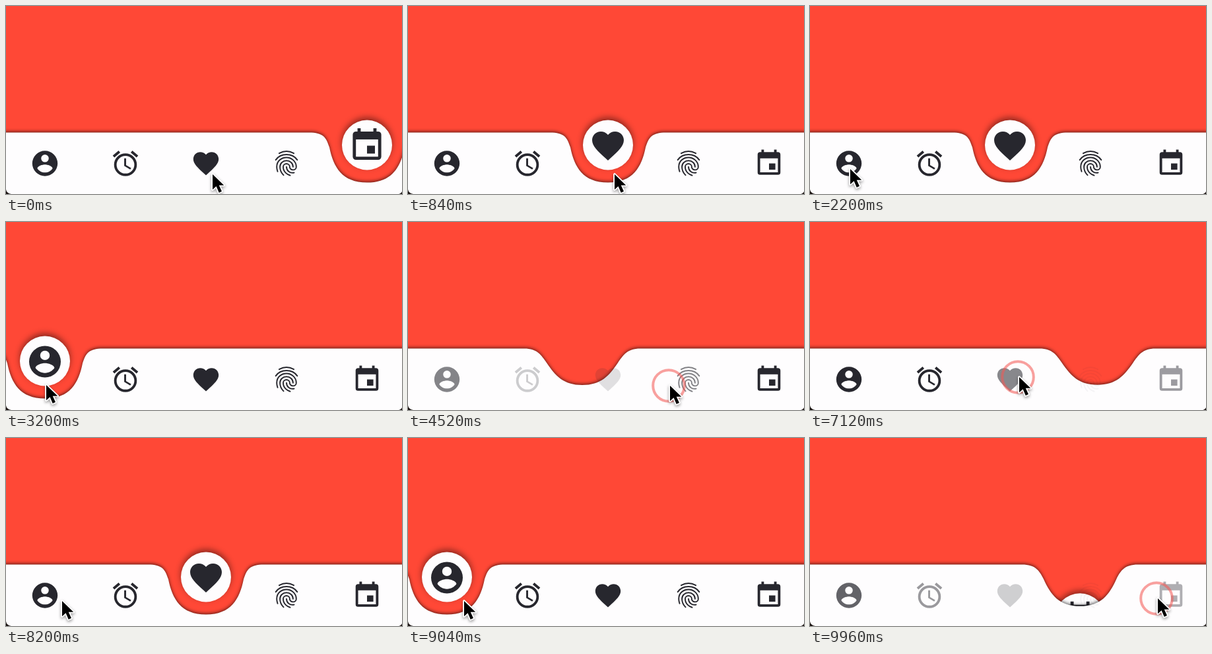
Recreate the animation shown at these times as an HTML page with a canvas. Size 600 by 286 pixels, loop 10 s.

```html
<!DOCTYPE html>
<html lang="en">
<head>
<meta charset="utf-8">
<title>Curved navigation bar</title>
<style>
  html, body { margin: 0; width: 100%; height: 100%; overflow: hidden; background: #ff4836; }
  canvas { display: block; width: 600px; height: 286px; }
</style>
</head>
<body>
<canvas id="stage" width="600" height="286"></canvas>
<script>
const ctx = document.getElementById('stage').getContext('2d');
const LOOP = 10000, TRAVEL = 450;
const RED = '#ff4836', WHITE = '#fefdfe', INK = '#27272e';
const BAR_TOP = 192.6, BUTTON_Y = 211.5;

// Icons live on a 24 unit grid; "line" paths are stroked, "fill" paths filled.
const icons = [
  { fill: 'M12 2a10 10 0 1 0 0 20a10 10 0 0 0 0-20zM12 5a3 3 0 1 1 0 6a3 3 0 0 1 0-6z' +
          'M12 19.2c-2.5 0-4.7-1.3-6-3.2c0-2 4-3.1 6-3.1s6 1.1 6 3.1c-1.3 1.9-3.5 3.2-6 3.2z' },
  { line: 'M20 13a8 8 0 1 1-16 0a8 8 0 1 1 16 0zM2.6 6.5l4.6-3.9M21.4 6.5l-4.6-3.9', width: 2,
    fill: 'M11 8h1.5v5.25l4 2.37l-.75 1.23L11 14z' },
  { fill: 'M12 21.35l-1.45-1.32C5.4 15.36 2 12.28 2 8.5C2 5.42 4.42 3 7.5 3c1.74 0 3.41.81 4.5 2.09' +
          'C13.09 3.81 14.76 3 16.5 3C19.58 3 22 5.42 22 8.5c0 3.78-3.4 6.86-8.55 11.54z' },
  { line: 'M6.2 4C9.8 2 14.2 2 17.8 4M3.5 9.2C7.5 3.6 16.5 3.6 20.5 9.2' +
          'M5 18.4c-.6-1.6-.7-2.9-.7-3.7C4.3 10.5 7.5 7.3 12 7.3c4.2 0 7.7 3.3 7.7 7.4' +
          'a2.58 2.44 0 0 1-5.16 0a2.58 2.44 0 0 0-5.16 0c0 1.8.7 3.5 2 4.8c1 1 2 1.6 3.5 2' +
          'M9.7 21.3C8 19.6 6.84 17.8 6.84 14.7a5.16 4.9 0 0 1 10.32 0' +
          'M18 19.3c-3.5.7-6-1.7-6-4.6', width: 1 },
  { fill: 'M17 12h-5v5h5zM16 1v2H8V1H6v2H5a2 2 0 0 0-2 2v14a2 2 0 0 0 2 2h14a2 2 0 0 0 2-2V5' +
          'a2 2 0 0 0-2-2h-1V1zM19 19H5V8h14z' }
].map(({ fill, line, width }) => ({
  fill: fill && new Path2D(fill), line: line && new Path2D(line), width
}));
const arrow = new Path2D('M0 0V25L6 19.5L10.5 30L15 28L10.5 18H18.5Z');

// [start time, from, to]
const trips = [
  [320, 4, 2], [2290, 2, 0], [4345, 0, 3], [5632, 3, 4],
  [6982, 4, 2], [8400, 2, 0], [9722, 0, 4]
];
// [time, x, y] of the pointer tip
const pointerKeys = [
  [0, 313, 255], [1520, 313, 255], [1960, 61, 247], [3520, 61, 247], [4240, 397, 248],
  [5040, 397, 248], [5440, 541, 251], [6080, 541, 251], [6700, 317, 235],
  [7440, 317, 235], [8160, 85, 247], [9120, 85, 247], [9640, 527, 243], [LOOP, 527, 243]
];

const clamp = v => Math.min(1, Math.max(0, v));
const mix = (a, b, k) => a + (b - a) * k;
const iconX = index => 59 + 122 * index;

// cubic-bezier(0, 0, .58, 1)
function easeOut(x) {
  let low = 0, high = 1;
  for (let i = 0; i < 20; i++) {
    const s = (low + high) / 2;
    if (1.74 * s * s * (1 - s) + s ** 3 < x) low = s; else high = s;
  }
  return low * low * (3 - 2 * low);
}

function pointerAt(t) {
  const next = pointerKeys.findIndex(key => key[0] > t);
  const [t0, x0, y0] = pointerKeys[next - 1], [t1, x1, y1] = pointerKeys[next];
  const u = (t - t0) / (t1 - t0), k = u * u * (3 - 2 * u);
  return [mix(x0, x1, k), mix(y0, y1, k)];
}

function drawIcon(index, x, y, scale, opacity = 1) {
  const { fill, line, width } = icons[index];
  ctx.save();
  ctx.globalAlpha = clamp(opacity);
  ctx.translate(x, y);
  ctx.scale(scale, scale);
  ctx.translate(-12, -12);
  ctx.fillStyle = ctx.strokeStyle = INK;
  if (fill) ctx.fill(fill, 'evenodd');
  if (line) {
    ctx.lineWidth = width;
    ctx.lineCap = width === 1 ? 'round' : 'butt';
    ctx.stroke(line);
  }
  ctx.restore();
}

function withShadow(blur, offset, alpha, draw) {
  ctx.save();
  ctx.shadowColor = `rgba(0,0,0,${alpha})`;
  ctx.shadowBlur = blur;
  ctx.shadowOffsetY = offset;
  draw();
  ctx.restore();
}

function drawButton(x, drop, index) {
  withShadow(10, -4, 0.45, () => {
    ctx.fillStyle = WHITE;
    ctx.beginPath();
    ctx.arc(x, BUTTON_Y + drop, 38, 0, 7);
    ctx.fill();
  });
  drawIcon(index, x, BUTTON_Y + 1 + drop, 2.4);
}

// The notch relaxes from a deep cup (soft = 0) to a shallow wave (soft = 1).
function drawBar(x, soft) {
  const m = (a, b) => mix(a, b, soft);
  const bottom = m(268.5, 247.3);
  const neck = [m(66, 68), BAR_TOP], bend = [m(62, 62), m(200, 203)];
  const side = [m(57, 54), m(215, 214)], wall = [m(51, 40), m(245, 234)];
  const base = [m(38, 28), bottom];
  const left = ([dx, y]) => [x - dx, y], right = ([dx, y]) => [x + dx, y];
  const curve = (...points) => ctx.bezierCurveTo(...points.flat());
  withShadow(5, -1.5, 0.6, () => {
    ctx.fillStyle = WHITE;
    ctx.beginPath();
    ctx.moveTo(-20, BAR_TOP);
    ctx.lineTo(x - 88, BAR_TOP);
    curve(left(neck), left(bend), left(side));
    curve(left(wall), left(base), [x, bottom]);
    curve(right(base), right(wall), right(side));
    curve(right(bend), right(neck), [x + 88, BAR_TOP]);
    ctx.lineTo(Math.max(620, x + 88), BAR_TOP);
    ctx.lineTo(720, 310);
    ctx.lineTo(-20, 310);
    ctx.fill();
  });
}

function drawCorners() {
  ctx.fillStyle = '#1b1412';
  ctx.fill(new Path2D('M0 279Q1 285 8 286H0ZM600 282Q599 285 595 286H600Z'));
}

function drawPointer(t, sinceStart) {
  const [x, y] = pointerAt(t);
  if (sinceStart > -80 && sinceStart < 380) {
    const [rx, ry] = pointerAt(Math.max(0, t - 30));
    const alpha = Math.min((sinceStart + 80) / 80, (380 - sinceStart) / 90, 1);
    ctx.strokeStyle = `rgba(244,88,84,${0.56 * alpha})`;
    ctx.lineWidth = 4;
    ctx.beginPath();
    ctx.arc(rx - 2, ry + 1, 23.8, 0, 7);
    ctx.stroke();
  }
  ctx.save();
  ctx.translate(x, y + 1);
  ctx.scale(0.93, 0.93);
  ctx.lineJoin = 'round';
  ctx.strokeStyle = '#fff';
  ctx.lineWidth = 4;
  withShadow(4, 2, 0.4, () => ctx.stroke(arrow));
  ctx.fillStyle = '#000';
  ctx.fill(arrow);
  ctx.restore();
}

function iconOpacity(index, position, progress, from, to) {
  if (progress >= 1) return index === to ? 0 : 1;
  if (progress <= 0) return index === from ? 0 : 1;
  const span = Math.abs(to - from);
  // On long trips the icons still ahead stay a little stronger.
  const ahead = (index - position) * (to - from) > 0;
  const strength = ahead && span > 2 ? 1.3 : 1;
  return clamp(strength * Math.abs(position - index) / span);
}

function render(t) {
  const trip = trips.filter(([start]) => t >= start - 80).pop() || trips[0];
  const [start, from, to] = trip;
  const progress = easeOut(clamp((t - start) / TRAVEL));
  const settled = t >= start + TRAVEL ? 1 : t <= start ? 0 : progress;
  const position = mix(from, to, settled);
  const hide = 1 - Math.abs(2 * settled - 1);
  const x = iconX(position);

  ctx.fillStyle = RED;
  ctx.fillRect(0, 0, 600, 286);
  drawButton(x, 111 * hide, settled > 0.5 ? to : from);
  drawBar(x, Math.sin(hide * Math.PI / 2) ** 2);
  icons.forEach((_, i) =>
    drawIcon(i, iconX(i), 239.5, 1.92, iconOpacity(i, position, settled, from, to)));
  drawCorners();
  drawPointer(t, t - start);
}

function tick() {
  render(performance.now() % LOOP);
  requestAnimationFrame(tick);
}
tick();
</script>
</body>
</html>
```
